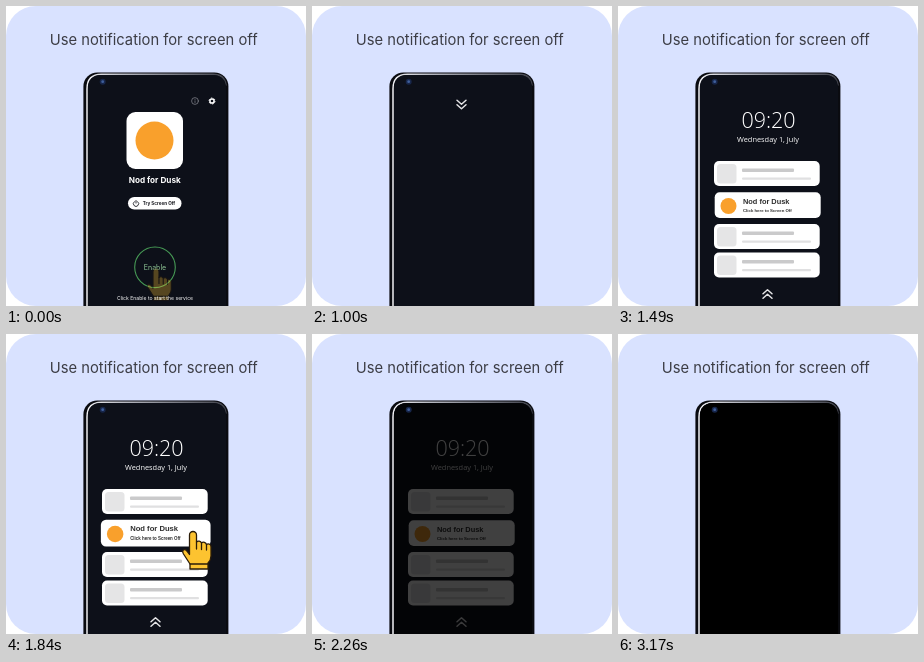
An HTML page that plays this animation: 300 by 300 pixels, repeating every 3310 ms.

```html
<!DOCTYPE html>
<html lang="en">
<head>
<meta charset="utf-8">
<title>Screen off from a notification</title>
<style>
  html, body { margin: 0; height: 100%; overflow: hidden; background: #fff; }
  svg { display: block; width: 100vw; height: 100vh; }
  text { font-family: Inter, sans-serif; }
  .mid { text-anchor: middle; }
  .clock text { font-family: "Open Sans", sans-serif; fill: #fff; }
  .card text { font-family: "Liberation Sans", Arial, sans-serif; font-weight: 700; fill: #2e2e2e; }
  .line { fill: none; stroke-linecap: round; stroke-linejoin: round; }
</style>
</head>
<body>
<svg viewBox="0 0 300 300">
  <defs>
    <linearGradient id="shine">
      <stop offset="0" stop-color="#f0f0f4"/>
      <stop offset=".25" stop-color="#b9bbc4"/>
      <stop offset="1" stop-color="#41434c"/>
    </linearGradient>
    <clipPath id="screenClip"><rect x="82" y="69" width="138" height="260" rx="12"/></clipPath>
    <clipPath id="panelClip"><rect x="82" y="84" width="138" height="216"/></clipPath>
    <path id="power" class="line" d="M-8.500-11A14 14 0 1 0 8.500-11M0-17V-3"/>
    <g id="hand" class="line" stroke="#2b1c08" stroke-width="1.300">
      <path fill="#fdc330" d="M-3.500 20V3a3.500 3.500 0 0 1 7 0V10a3 3 0 0 1 5 1a3 3 0 0 1 5 1.500a2.800 2.800 0 0 1 4.500 2.500V24Q18 28 15 31V37H-3V32L-9.500 22q-2-3.500 1-4.500q2 0 5 5z"/>
      <path d="M3.500 10v7M8.500 11.500v6M13.500 13v5M-3 32H15"/>
    </g>
    <g id="blankCard">
      <rect x="96" width="105.700" height="25" rx="5" fill="#fff"/>
      <rect x="99" y="3" width="19.500" height="19.500" rx="3.500" fill="#e5e5e6"/>
      <rect x="124" y="7.500" width="52" height="3.600" rx="1" fill="#cacacb"/>
      <rect x="124" y="16.500" width="69" height="2.200" rx="1" fill="#e0e0e1"/>
    </g>
  </defs>

  <rect width="300" height="300" rx="30" fill="#d9e2ff"/>
  <text class="mid" x="147.700" y="39" font-size="14.750" fill="#3c3d45">Use notification for screen off</text>

  <rect x="77.400" y="66.400" width="145" height="260" rx="14" fill="#0a0b10"/>
  <path class="line" d="M81 302V83Q81 68.300 95.500 68.300H207Q218.500 68.300 220 79" stroke="url(#shine)" stroke-width="1.500"/>

  <g clip-path="url(#screenClip)">
    <rect x="82" y="69" width="138" height="260" fill="#0d1019"/>

    <g id="home" fill="#fff">
      <g class="line" stroke="#8a8c94" stroke-width=".7">
        <circle cx="189" cy="95" r="3.400"/><path d="M189 94.800v1.700M189 93.300v.1"/>
      </g>
      <circle cx="206" cy="95" r="2.100" fill="none" stroke="#fff" stroke-width="1.500"/>
      <circle cx="206" cy="95" r="3" fill="none" stroke="#fff" stroke-width=".9" stroke-dasharray="1.570"/>
      <rect x="120.500" y="106" width="56.500" height="57" rx="9"/>
      <circle cx="148.500" cy="134.500" r="19" fill="#f9a02c"/>
      <text class="mid" x="148.700" y="176.500" font-size="8.200" font-weight="700">Nod for Dusk</text>
      <rect x="122" y="191" width="53.500" height="12.500" rx="6.250"/>
      <use href="#power" transform="translate(130 197.700) scale(.19)" stroke="#16171d" stroke-width="4.500"/>
      <text x="136.700" y="199" font-size="4.600" font-weight="700" fill="#16171d">Try Screen Off</text>
      <g id="enable">
        <circle cx="149" cy="261.300" r="20.300" fill="none" stroke="#469a55" stroke-width="1.100"/>
        <text class="mid" x="149" y="264" font-size="7" fill="#8fc796">Enable</text>
      </g>
      <use id="enableHand" href="#hand"/>
      <text class="mid" x="149" y="294" font-size="5.100">Click Enable to start the service</text>
    </g>

    <g id="shade">
      <g clip-path="url(#panelClip)">
        <g id="panel">
          <g class="clock mid">
            <text x="150.500" y="121.500" font-size="21.500" font-weight="300">09:20</text>
            <text x="150" y="136" font-size="7.400" font-weight="500">Wednesday 1, July</text>
          </g>
          <use href="#blankCard" y="155"/>
          <use href="#blankCard" y="218"/>
          <use href="#blankCard" y="246.500"/>
          <g id="card" class="card">
            <rect x="96.700" y="186.300" width="106" height="25.700" rx="5" fill="#fff"/>
            <circle cx="110.500" cy="200" r="8" fill="#f9a02c"/>
            <text x="125" y="197.500" font-size="7.400">Nod for Dusk</text>
            <text x="125" y="205.500" font-size="4.300">Click here to Screen Off</text>
          </g>
          <path id="chevron" class="line" d="M-4.500-4L0 0L4.500-4M-4.500 .5L0 4.500L4.500 .5" stroke="#e4e4e6" stroke-width="1.500"/>
        </g>
      </g>
      <use id="cardHand" href="#hand"/>
    </g>

    <rect id="dim" x="82" y="69" width="138" height="260"/>
    <g id="off" transform="translate(150 200)">
      <circle r="32" fill="#2c2d32"/>
      <use href="#power" y="1" stroke="#000" stroke-width="3.600"/>
    </g>
  </g>

  <circle cx="96.700" cy="75.700" r="3" fill="#17264a"/>
  <circle cx="96.700" cy="75.700" r="1.400" fill="#3f5f9c"/>
</svg>

<script>
const LOOP = 3310;
const HOLDS = [2400, 2540, 2610, 2750, 2960, 3170];
const $ = id => document.getElementById(id);
const ramp = (t, from, to) => Math.min(1, Math.max(0, (t - from) / (to - from)));
const pulse = (t, a, b, c, d) => Math.min(ramp(t, a, b), 1 - ramp(t, c, d));
const easeInOut = x => x < .5 ? 4 * x ** 3 : 1 - 4 * (1 - x) ** 3;
const place = (id, transform) => $(id).setAttribute('transform', transform);
const fade = (id, opacity) => $(id).setAttribute('opacity', opacity);
const scaleAt = (x, y, s) => `translate(${x} ${y}) scale(${s}) translate(${-x} ${-y})`;

// The picture advances in steps: 100 ms, then 70 ms, then uneven holds.
function snap(t) {
  if (t < 1000) return Math.min(700, Math.floor(t / 100) * 100);
  if (t < HOLDS[0]) return 1000 + Math.floor((t - 1000) / 70) * 70;
  return HOLDS.findLast(start => start <= t);
}

function draw(t) {
  const atHome = t < 1000;
  $('home').style.display = atHome ? '' : 'none';
  $('shade').style.display = atHome ? 'none' : '';

  const tap = pulse(t, 200, 300, 400, 500);
  place('enable', scaleAt(149, 261.3, 1 - .06 * tap));
  place('enableHand', `translate(150 263) scale(${.85 - .07 * tap})`);
  fade('enableHand', pulse(t, -90, 210, 500, 700));

  const slide = easeInOut(ramp(t, 1000, 1485));
  place('panel', `translate(0 ${-190 * (1 - slide)})`);
  place('chevron', `translate(149.5 288.3) scale(1 ${t < 1490 ? 1 : -1})`);

  const press = pulse(t, 1700, 1840, 1840, 1980);
  place('card', scaleAt(149.5, 199.5, 1 + .035 * press));
  place('cardHand', `translate(187 ${198 + 6 * (1 - ramp(t, 1490, 1700))})`);
  fade('cardHand', pulse(t, 1490, 1700, 1910, 2050));

  fade('dim', ramp(t, 2050, 2330));
  fade('off', pulse(t, 2400, 2610, 2750, 3170));
}

function tick(now) {
  draw(snap(now % LOOP));
  requestAnimationFrame(tick);
}
requestAnimationFrame(tick);
</script>
</body>
</html>
```
